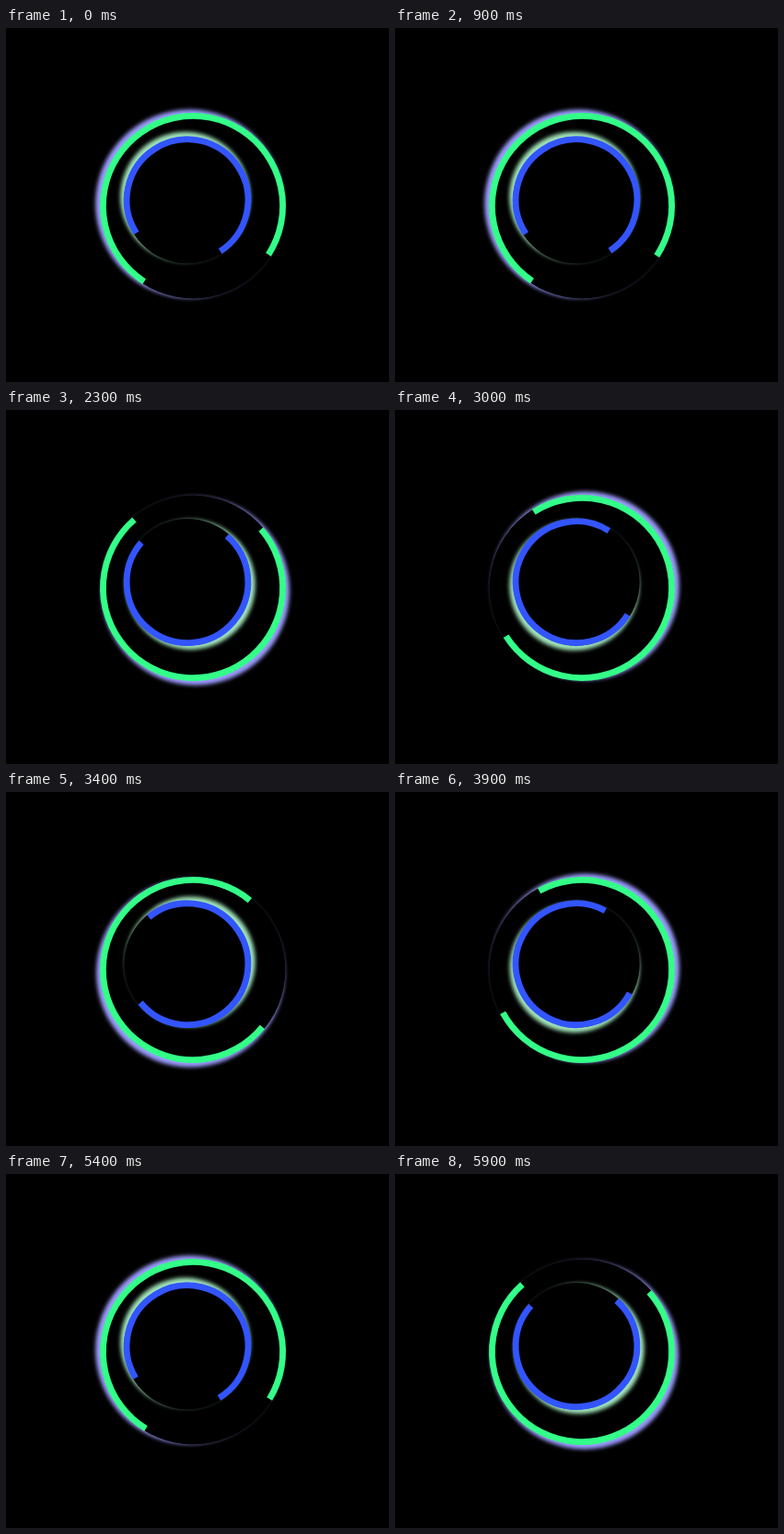
Animation, 416 px wide and 384 px high, one loop 6 s. Source, as an HTML page with a canvas:

```html
<!DOCTYPE html>
<html lang="en">
<head>
<meta charset="utf-8">
<title>Ring loader</title>
<style>
html, body { margin: 0; width: 100%; height: 100%; overflow: hidden; background: #000; }
canvas { display: block; }
</style>
</head>
<body>
<canvas id="stage" width="416" height="384"></canvas>
<script>
const ctx = document.getElementById('stage').getContext('2d');
const W = 416, H = 384, LOOP = 6000, STEP = 100, STROKE = 6.8;
const TAU = Math.PI * 2;
const OFFSET = 3 * Math.SQRT2, BLUR = 4.5, SPREAD = 1.2, FAR = 1000;

const rings = [
  { x: 203, y: 193, r: 101, color: '#33ff88', glow: '#9c9cff', dir: 1 },
  { x: 197, y: 186.7, r: 69.3, color: '#3355ff', glow: '#a0e4b8', dir: -1 }
];

// [step, degrees]: about 40 degrees per step, with slight speed changes
const turns = [
  [0, 167.8], [9, 528.6], [23, 1084.3], [30, 1362.6],
  [39, 1726.6], [48, 2090.2], [59, 2523.5]
];

function turnAt(step) {
  const i = Math.max(1, turns.findIndex(k => k[0] >= step));
  const [s0, a0] = turns[i - 1], [s1, a1] = turns[i];
  return (a0 + (a1 - a0) * (step - s0) / (s1 - s0)) * Math.PI / 180;
}

function circle(x, y, r) {
  ctx.moveTo(x + r, y);
  ctx.arc(x, y, r, 0, TAU);
}

// Blurred disc, offset and shown only outside the ring's edge
function drawGlow({ x, y, r, glow }, angle) {
  const heading = angle + Math.PI / 4;
  ctx.save();
  ctx.beginPath();
  ctx.rect(0, 0, W, H);
  circle(x, y, r - 0.5);
  ctx.clip('evenodd');
  ctx.shadowColor = glow;
  ctx.shadowBlur = BLUR;
  ctx.shadowOffsetX = FAR + OFFSET * Math.cos(heading);
  ctx.shadowOffsetY = OFFSET * Math.sin(heading);
  ctx.fillStyle = '#000';
  ctx.beginPath();
  circle(x - FAR, y, r + SPREAD);
  ctx.fill();
  ctx.restore();
}

function drawRing(ring, turn) {
  const angle = turn * ring.dir;
  drawGlow(ring, angle);
  ctx.strokeStyle = ring.color;
  ctx.lineWidth = STROKE;
  ctx.beginPath();
  ctx.arc(ring.x, ring.y, ring.r - STROKE / 2, angle - Math.PI / 4, angle + Math.PI * 5 / 4);
  ctx.stroke();
}

const start = performance.now();

function frame() {
  const time = (performance.now() - start) % LOOP;
  const turn = turnAt(Math.floor(time / STEP));
  ctx.fillStyle = '#000';
  ctx.fillRect(0, 0, W, H);
  rings.forEach(ring => drawRing(ring, turn));
  requestAnimationFrame(frame);
}
frame();
</script>
</body>
</html>
```
